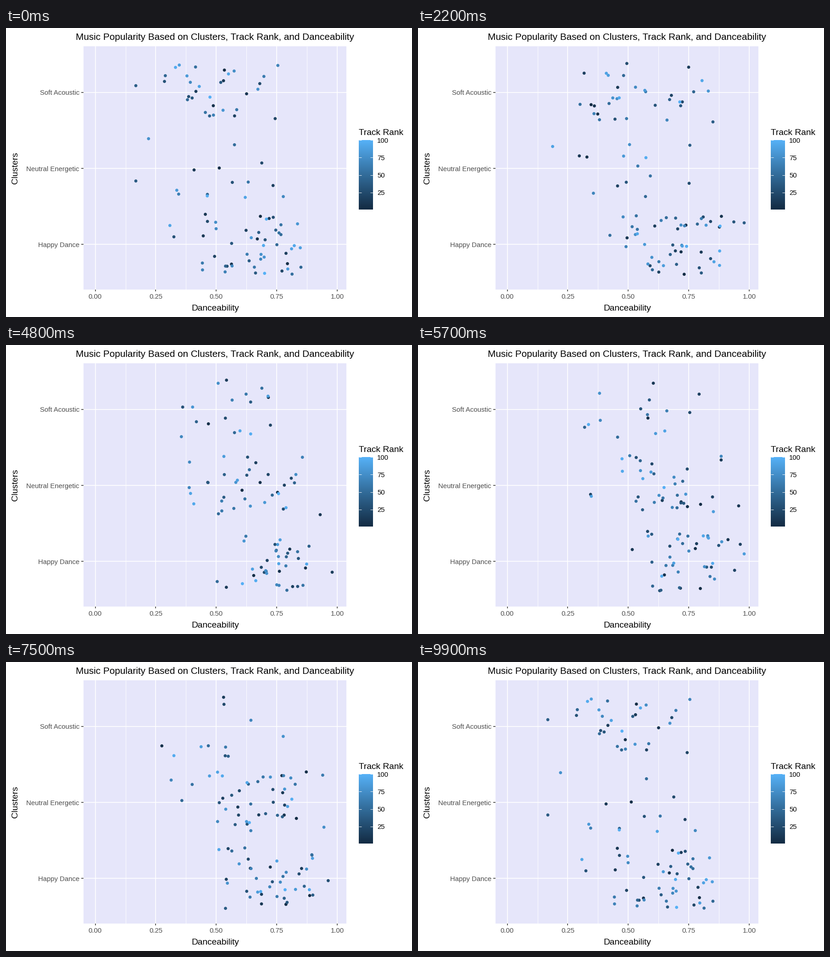
Animation of 885 by 632 pixels, one loop 10 s. Source, as a matplotlib script:

```python
import numpy as np
import matplotlib.pyplot as plt
from matplotlib.animation import FuncAnimation
from matplotlib.colors import LinearSegmentedColormap

W, H, DPI = 885, 632, 100
PT = 72 / DPI
TICKS = 100
LEFT, TOP, RIGHT, BOTTOM = 169, 40, 741.5, 571.5
ROWS = {"Soft Acoustic": 140.5, "Neutral Energetic": 306.5, "Happy Dance": 472.5}
SPREAD = 66.4
GREY, DARK = "#4D4D4D", "#333333"
RANK = LinearSegmentedColormap.from_list("rank", ["#132B43", "#326C9A", "#56B1F7"])

# How cluster size, mean x and deviation drift over the ticks.
KEYS = [0, 22, 38, 48, 65, 84]
COUNT = [[32, 33, 16, 18, 13, 9], [15, 14, 26, 36, 39, 51], [49, 51, 53, 38, 47, 37]]
MEAN = [[450, 480, 486, 490, 480, 449], [455, 454, 500, 528, 547, 545],
        [537, 565, 602, 589, 590, 573]]
DEV = [[75, 85, 92, 62, 85, 55], [100, 82, 75, 75, 70, 80], [72, 72, 65, 52, 70, 58]]

plt.rcParams["font.family"] = ["Liberation Sans", "DejaVu Sans"]
fig = plt.figure(figsize=(W / DPI, H / DPI), dpi=DPI, facecolor="white")
ax = fig.add_axes([0, 0, 1, 1])


def line(x0, y0, x1, y1, width, color="white"):
    ax.plot([x0, x1], [y0, y1], color=color, lw=width * PT,
            solid_capstyle="butt", zorder=2)


def label(x, y, text, size, color="black", ha="left", **kw):
    ax.text(x, y, text, size=size * PT, color=color, ha=ha, va="baseline", **kw)


def draw_chart():
    ax.add_patch(plt.Rectangle((LEFT, TOP), RIGHT - LEFT, BOTTOM - TOP,
                               fc="#E6E6FA", ec="none", zorder=0))
    for k in range(4):
        x = 260.5 + 131.9 * k
        line(x, TOP, x, BOTTOM, 0.9)
    for k in range(5):
        x = 194.5 + 131.9 * k
        line(x, TOP, x, BOTTOM, 1.7)
        line(x, BOTTOM, x, BOTTOM + 4.5, 1.5, DARK)
        label(x, 592.5, f"{k / 4:.2f}", 14.9, GREY, "center")
    for name, y in ROWS.items():
        line(LEFT, y, RIGHT, y, 1.7)
        line(LEFT - 5, y, LEFT, y, 1.5, DARK)
        label(160, y + 6, name, 14.9, GREY, "right")
    label(455.7, 26, "Music Popularity Based on Clusters, Track Rank, and Danceability",
          20.7, ha="center")
    label(456, 618, "Danceability", 19.1, ha="center")
    label(25, 306.5, "Clusters", 19.1, ha="center", rotation=90, rotation_mode="anchor")


def draw_legend():
    label(769, 233.5, "Track Rank", 19.1)
    ramp = np.linspace(1, 0, 256)[:, None]
    ax.imshow(ramp, cmap=RANK, extent=(769, 799.5, 397, 245), aspect="auto", zorder=1)
    for k in range(4):
        y = 245.3 + 38.1 * k
        line(769, y, 775, y, 0.9)
        line(793.5, y, 799.5, y, 0.9)
        label(809, y + 5.7, str(100 - 25 * k), 14.9)


def make_year(tick):
    """Jittered points of one year: positions and ranks."""
    rng = np.random.default_rng(tick)
    points, ranks = [], []
    for row, mid in enumerate(ROWS.values()):
        n, mean, dev = (np.interp(tick, KEYS, t[row]) for t in (COUNT, MEAN, DEV))
        n = round(n)
        z = rng.normal(size=n)
        z = (z - z.mean()) / z.std()
        x = np.clip(mean + dev * z, 283, 711)
        points.append(np.column_stack([x, mid + rng.uniform(-SPREAD, SPREAD, n)]))
        ranks.append((np.arange(n) + 0.5) / n)
    return np.vstack(points), np.concatenate(ranks)


# Each year stays two ticks, a few only one; the last tick returns to the first year.
SHORT = {0, 17, 50, 83, 98, 99}
starts = [0]
while starts[-1] < TICKS - 1:
    starts.append(starts[-1] + (1 if starts[-1] in SHORT else 2))
scenes = [make_year(s) for s in starts[:-1]]
scenes.append(scenes[0])

draw_chart()
draw_legend()
ax.set(xlim=(0, W), ylim=(H, 0))
ax.axis("off")
dots = ax.scatter([], [], s=(6.8 * PT) ** 2, linewidths=0, zorder=3)


def update(tick):
    points, ranks = scenes[np.searchsorted(starts, tick, side="right") - 1]
    dots.set_offsets(points)
    dots.set_facecolors(RANK(ranks))
    return dots,


anim = FuncAnimation(fig, update, frames=TICKS, interval=100,
                     repeat=True, repeat_delay=0, blit=False)
plt.show()
```
